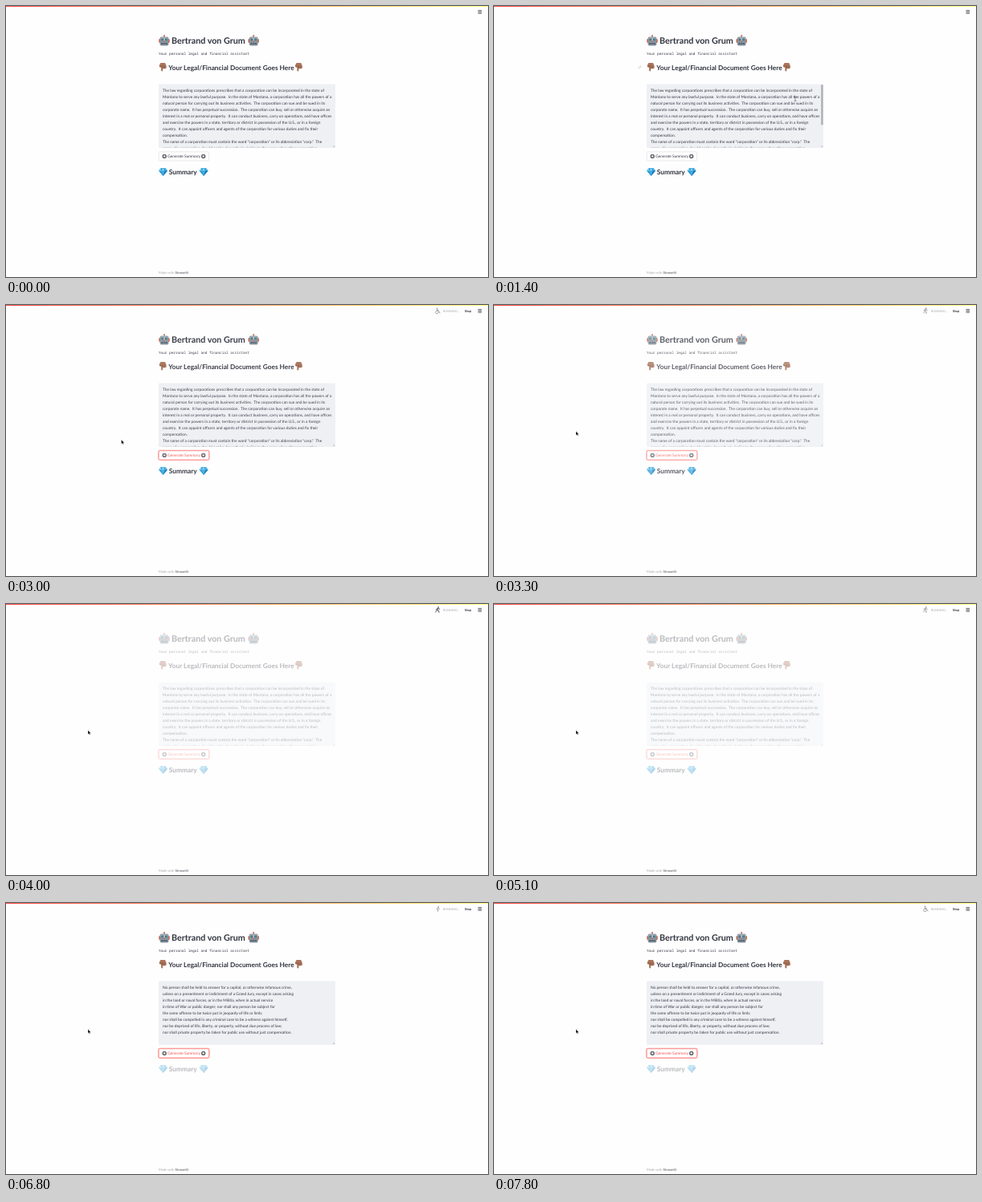
These frames come from a looping animation (600 by 338 pixels, 8 s). An HTML page:

```html
<!DOCTYPE html>
<html lang="en">
<head>
<meta charset="utf-8">
<title>Legal assistant</title>
<style>
html, body { margin: 0; width: 100%; height: 100%; overflow: hidden; background: #fefefe; }
svg { display: block; width: 600px; height: 338px; }
text { font-family: Lato, "Open Sans", sans-serif; fill: #31333f; white-space: pre; text-rendering: geometricPrecision; }
.h { font-weight: 700; }
.body text { font-size: 4.82px; }
.mono { font-family: "Noto Sans Mono", "DejaVu Sans Mono", monospace; font-size: 4.38px; }
.line { fill: none; stroke: #31333f; stroke-linecap: round; stroke-linejoin: round; }
</style>
</head>
<body>
<svg viewBox="0 0 600 338">
  <defs>
    <linearGradient id="bar"><stop stop-color="#ff4b4b"/><stop offset="1" stop-color="#fffd80"/></linearGradient>
    <clipPath id="box"><rect x="190" y="97.5" width="220" height="79"/></clipPath>
    <g id="robot">
      <path d="M7 0.8V3" stroke="#7d8791" stroke-width="1"/>
      <circle cx="7" cy="1" r="0.9" fill="#d9573f"/>
      <rect x="0.3" y="5" width="13.4" height="5" rx="1.2" fill="#d0613f"/>
      <rect x="1.6" y="2.6" width="10.8" height="10.8" rx="1.6" fill="#8796a2"/>
      <rect x="2.6" y="3.4" width="8.8" height="3.8" rx="1.4" fill="#a9b6bf"/>
      <circle cx="4.6" cy="6" r="1.4" fill="#2f5563"/><circle cx="9.4" cy="6" r="1.4" fill="#2f5563"/>
      <circle cx="4.6" cy="6" r="0.6" fill="#8fd8e6"/><circle cx="9.4" cy="6" r="0.6" fill="#8fd8e6"/>
      <path d="M7 7.2L8 8.9H6z" fill="#d9573f"/>
      <rect x="3.4" y="10" width="7.2" height="2" rx="0.5" fill="#42515c"/>
      <path d="M5.2 10v2M7 10v2M8.8 10v2" stroke="#cfd8dd" stroke-width="0.4"/>
    </g>
    <g id="hand">
      <path d="M2.4 0.3H8L9.6 3.6V6.4Q8.8 7.6 7.6 7.2Q6.6 7.8 5.2 7.2V10Q4.2 11.4 3.1 10V6L0.9 5.2Q0.4 3 2.4 0.3Z" fill="#a9745a"/>
      <path d="M5.2 3.6V7M7.2 4V7M1.4 4.6Q3.4 5.4 5 3.6" fill="none" stroke="#744632" stroke-width="0.5"/>
    </g>
    <g id="gem">
      <path d="M2.4 1.2H8.6L11 4.4L5.5 11L0 4.4Z" fill="#2797d3"/>
      <path d="M2.4 1.2L3.3 4.4H0ZM5.5 1.2L7.7 4.4H3.3Z" fill="#8bd6f2"/>
      <path d="M8.6 1.2L7.7 4.4H11Z" fill="#55b9e6"/>
      <path d="M3.3 4.4H7.7L5.5 11Z" fill="#45b0e3"/>
      <path d="M7.7 4.4H11L5.5 11Z" fill="#1a78b5"/>
    </g>
    <g id="plus">
      <circle r="2.75" fill="#686a70"/>
      <path d="M-1.4 0H1.4M0 -1.4V1.4" stroke="#fff" stroke-width="0.8"/>
    </g>
  </defs>

  <rect width="600" height="338" fill="#fefefe"/>
  <rect width="600" height="1" fill="url(#bar)"/>
  <path class="line" d="M587.9 5.6h3.9M587.9 7.4h3.9M587.9 9.2h3.9" stroke-width="0.8"/>

  <g id="status">
    <g id="man" class="line" stroke-width="0.9"><circle r="0.85" fill="#31333f" stroke="none"/><path/></g>
    <text x="544" y="8.7" font-size="3.8" fill-opacity="0.42">RUNNING...</text>
    <text x="571" y="8.9" font-size="4.05" class="h">Stop</text>
  </g>

  <g id="main">
    <use href="#robot" x="190" y="36"/>
    <text class="h" x="206" y="46.8" font-size="10.75">Bertrand von Grum</text>
    <use href="#robot" x="301.2" y="36"/>
    <text class="mono" x="190" y="60.7">Your personal legal and financial assistant</text>
    <use href="#hand" x="190" y="70.8"/>
    <text class="h" x="202.3" y="79.6" font-size="8.3">Your Legal/Financial Document Goes Here</text>
    <use href="#hand" x="359.2" y="70.8"/>
    <path id="link" class="line" d="M180.9 76.9l1.2-1.2M181.2 75.5l.6-.6a.8.8 0 0 1 1.2 1.2l-.6.6M181.8 77.1l-.6.6a.8.8 0 0 1-1.2-1.2l.6-.6" stroke-width="0.4" opacity="0.35"/>
    <rect x="190" y="97.5" width="220" height="79.4" rx="1.25" fill="#eef0f4"/>
    <g clip-path="url(#box)" class="body"><g id="law"></g><g id="oath"></g></g>
    <path class="line" d="M407.2 175.8l1.7-1.7M408.4 175.9l.6-.6" stroke-width="0.3" opacity="0.7"/>
    <rect id="thumb" x="407.2" y="98" width="2.4" height="50.5" rx="1.2" fill="#adafb3"/>
    <g id="button" class="body">
      <rect id="ring" x="189.8" y="181.4" width="63.2" height="12" rx="1.8" fill="none" stroke="#ff4b4b" stroke-opacity="0.45" stroke-width="1.3"/>
      <rect id="edge" x="190.2" y="181.8" width="62.4" height="11.2" rx="1.25" stroke-width="0.5"/>
      <use href="#plus" x="197.2" y="187.4"/>
      <text id="label" x="201.3" y="189">Generate Summary</text>
      <use href="#plus" x="245.7" y="187.4"/>
    </g>
  </g>

  <g id="summary">
    <use href="#gem" x="190" y="201"/>
    <text class="h" x="202.7" y="209.7" font-size="8.4">Summary</text>
    <use href="#gem" x="240.5" y="201"/>
  </g>

  <text x="190" y="333.5" font-size="4.15" fill-opacity="0.42">Made with <tspan class="h" fill-opacity="0.65">Streamlit</tspan></text>

  <g id="cursor">
    <path id="arrow" d="M0 0V5.2L1.2 4.1L2 5.9L2.9 5.5L2.1 3.8H3.6Z" fill="#000" stroke="#fff" stroke-width="0.3"/>
    <path id="beam" class="line" d="M-1 -2.6Q0 -2.6 0 -2Q0 -2.6 1 -2.6M0 -2V2M-1 2.6Q0 2.6 0 2Q0 2.6 1 2.6" stroke-width="0.5"/>
    <path id="point" d="M-0.6 -1.8Q0 -2.6 0.5 -1.8V0L2.3 0.5Q2.8 0.9 2.5 2L2 3.6H-1L-2.5 1.4Q-2.4 0.6 -1.6 1L-0.6 1.6Z" fill="#000" stroke="#fff" stroke-width="0.3"/>
  </g>
</svg>

<script>
const LOOP = 8000, STALE = 0.33;
const CLICK = 2400, RELEASE = 2600, RERUN = 2800, REPLY = 5200;
const $ = id => document.getElementById(id);
const show = (id, on) => $(id).setAttribute("visibility", on ? "visible" : "hidden");
const set = (node, attrs) => { for (const k in attrs) node.setAttribute(k, attrs[k]); };

const pages = {
  law: [
    "The law regarding corporations prescribes that a corporation can be incorporated in the state of",
    "Montana to serve any lawful purpose.  In the state of Montana, a corporation has all the powers of a",
    "natural person for carrying out its business activities.  The corporation can sue and be sued in its",
    "corporate name.  It has perpetual succession.  The corporation can buy, sell or otherwise acquire an",
    "interest in a real or personal property.  It can conduct business, carry on operations, and have offices",
    "and exercise the powers in a state, territory or district in possession of the U.S., or in a foreign",
    "country.  It can appoint officers and agents of the corporation for various duties and fix their",
    "compensation.",
    "The name of a corporation must contain the word \"corporation\" or its abbreviation \"corp.\"  The",
    "name of a corporation should not be deceptively similar to the name of another corporation"
  ],
  oath: [
    "No person shall be held to answer for a capital, or otherwise infamous crime,",
    "unless on a presentment or indictment of a Grand Jury, except in cases arising",
    "in the land or naval forces, or in the Militia, when in actual service",
    "in time of War or public danger; nor shall any person be subject for",
    "the same offense to be twice put in jeopardy of life or limb;",
    "nor shall be compelled in any criminal case to be a witness against himself,",
    "nor be deprived of life, liberty, or property, without due process of law;",
    "nor shall private property be taken for public use without just compensation."
  ]
};
for (const id in pages) pages[id].forEach((line, i) => {
  const t = document.createElementNS("http://www.w3.org/2000/svg", "text");
  set(t, { x: 195, y: 106.7 + i * 8.02 });
  t.textContent = line;
  $(id).append(t);
});

// head x, head y, limbs, opacity
const poses = [
  [536.6, 4.4, "M536.4 5.8L537 8H539L540 10M536.5 6.6H538.4M535.8 7.2A1.9 1.9 0 1 0 538.3 9.6", 0.5],
  [537.4, 4.4, "M537 5.8V8H539L540 10M537 6.6L539 6.8M535.8 7.2A1.9 1.9 0 1 0 538.3 9.6", 0.5],
  [538.2, 4.8, "M537.6 6L536 7.6L538 8.6L537.4 10.4M537.4 6.4L539.6 7.4", 0.5],
  [537.8, 4, "M537.3 5.3L536.5 7.6L538.2 8.6L537.8 10.5M536.5 7.8L534.6 9.6M535 6.6L537.2 5.6L539.4 6.6", 0.55],
  [538.2, 4, "M537.6 5.3L536.6 7.6L538.6 8.2L539 10.4M536.6 7.8L534.6 10.2M535.2 7L537.4 5.6L539.8 6.2", 0.95],
  [537, 4, "M534.4 5.8H539.6M537 5.8V8M536.3 10.6L536.6 7.6H537.4L537.7 10.6", 0.5]
];

// time, x, y
const path = [
  [300, 440, -6], [900, 356, 50], [1150, 360, 78], [1400, 375, 116], [1550, 373, 119],
  [1900, 250, 181], [2100, 221, 188], [2700, 221, 188], [3200, 102, 157.4]
];
const ease = p => p * p * (3 - 2 * p);

function cursorAt(t) {
  let i = path.findIndex(k => k[0] > t);
  if (i === 0) return [-20, -20];
  if (i < 0) return path[path.length - 1].slice(1);
  const [t0, x0, y0] = path[i - 1], [t1, x1, y1] = path[i];
  const p = ease((t - t0) / (t1 - t0));
  return [x0 + (x1 - x0) * p, y0 + (y1 - y0) * p];
}

function drawCursor(t) {
  const [x, y] = cursorAt(t);
  const inX = x > 190 && x < 410;
  const typing = inX && y > 97 && y < 177;
  const onButton = x > 190 && x < 253 && y > 181 && y < 194;
  set($("cursor"), { transform: `translate(${x} ${y})` });
  show("beam", typing);
  show("point", onButton);
  show("arrow", !typing && !onButton);
  show("thumb", typing && t < 2000);
  show("link", t > 1050 && t < 1500);
  return onButton;
}

function drawButton(t, hover) {
  const down = t >= CLICK && t < RELEASE, focus = t >= CLICK;
  const red = hover || focus;
  show("ring", focus);
  set($("edge"), {
    fill: down ? "#d2565f" : "#fefefe",
    stroke: down ? "#b9323f" : red ? "#ff4b4b" : "#d4d5d8"
  });
  $("label").style.fill = down ? "#fbe3e4" : red ? "#ff4b4b" : "#31333f";
}

function drawStatus(t) {
  show("status", t >= RERUN + 50);
  const [x, y, d, o] = poses[Math.min(78, Math.floor(t / 100)) % poses.length];
  const [head, limbs] = $("man").children;
  set(head, { cx: x, cy: y });
  set(limbs, { d });
  set($("man"), { opacity: o });
}

function draw(t) {
  drawButton(t, drawCursor(t));
  drawStatus(t);
  const p = Math.min(1, Math.max(0, (t - RERUN) / 1000));
  const fade = 1 - (1 - STALE) * p ** 1.6;
  set($("main"), { opacity: t < REPLY ? fade : 1 });
  set($("summary"), { opacity: fade });
  show("law", t < REPLY);
  show("oath", t >= REPLY);
}

const start = performance.now();
function tick(now) {
  draw(Math.max(0, now - start) % LOOP);
  requestAnimationFrame(tick);
}
draw(0);
requestAnimationFrame(tick);
</script>
</body>
</html>
```
